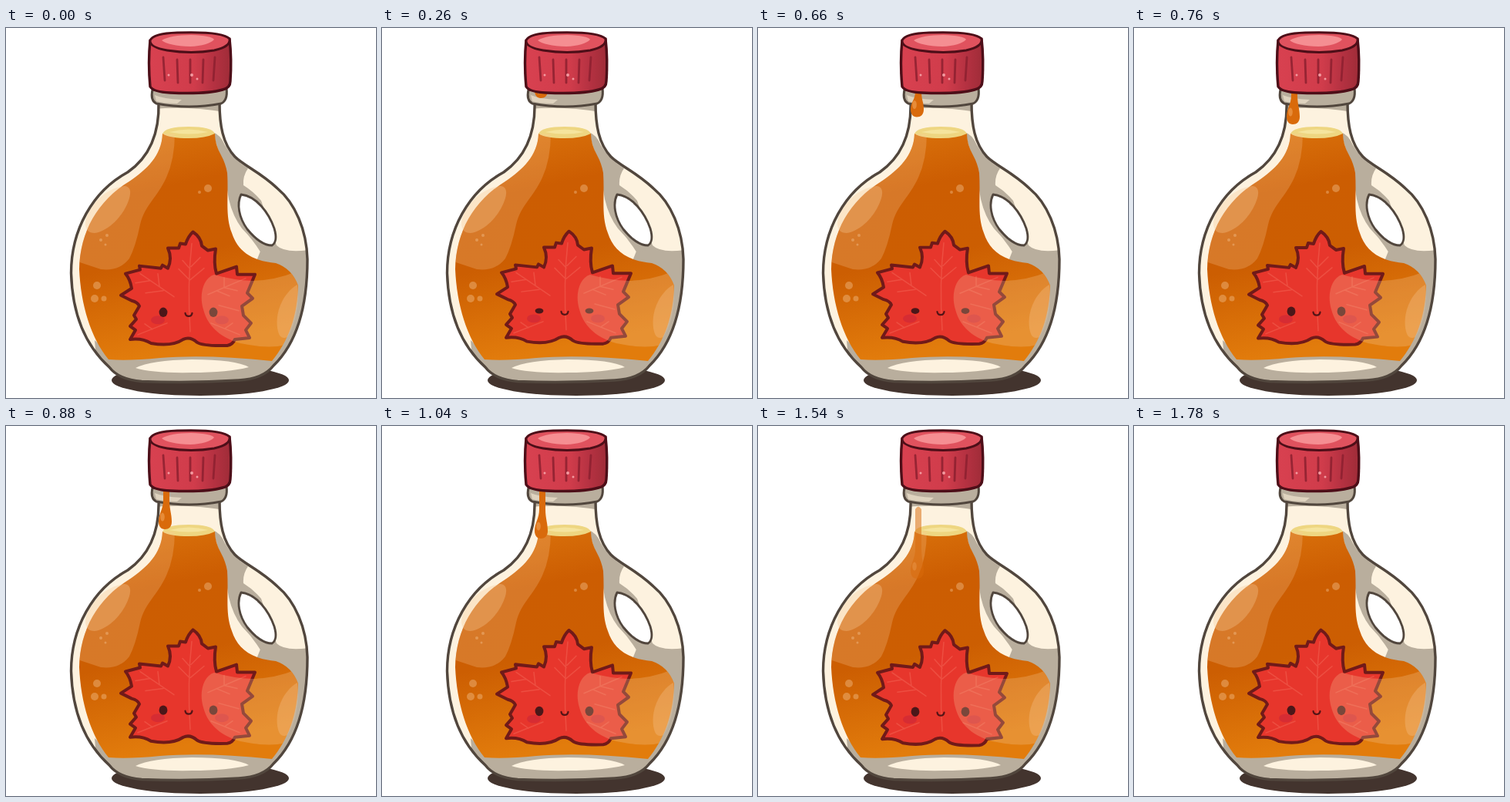
An HTML page for the animation above (1.8 s loop, 480 by 480 pixels).

```html
<!DOCTYPE html>
<html lang="en">
<head>
<meta charset="utf-8">
<title>Syrup bottle</title>
<style>
html, body { margin: 0; height: 100%; overflow: hidden; background: #fff; }
svg { display: block; width: 100vw; height: 100vh; }
</style>
</head>
<body>
<svg viewBox="0 0 480 480" fill="none" stroke-linecap="round" stroke-linejoin="round">
  <defs>
    <linearGradient id="syrup" x1="0" y1="0" x2=".2" y2="1">
      <stop offset="0" stop-color="#dc750d"/>
      <stop offset=".3" stop-color="#cc5d02"/>
      <stop offset=".6" stop-color="#cc5e02"/>
      <stop offset="1" stop-color="#e27c0c"/>
    </linearGradient>
    <linearGradient id="capSide">
      <stop offset="0" stop-color="#d84150"/>
      <stop offset=".55" stop-color="#d03c4b"/>
      <stop offset=".8" stop-color="#b43141"/>
      <stop offset="1" stop-color="#9f2c38"/>
    </linearGradient>
    <path id="glass" d="M198 96C199 130 191 164 158 187C112 212 84.500 262 84.500 318C86 370 103 412 134 440Q146 456 176 458.500Q240 461 302 457Q334 455 347 438C378 408 391 360 391 300C390 262 375 227 352 208C330 187 309 179 297 167C281 150 277 126 277 96Z"/>
    <path id="liquid" d="M203 137C202 166 182 184 160 199C119 224 96 264 95 313C97 359 110 402 133 430Q160 432 200 428Q260 423 345 432C366 407 378 374 379 334Q371 312 350 305C317 302 300 288 293 266C284 243 289 219 287 188Q285 176 279 165Q271 151 271 137Z"/>
    <path id="leaf" d="M242.500 264Q236 270 233 280L226 279L224 285L210 285Q216 298 210 311L203 307L201 311L173 308L174 313L155 318Q161 325 163 337L149 346L163 353Q171 355 173 360L166 372L169 377L161 386L168 391L161 403Q177 401 188 408Q215 413 230 403Q239 399 248 407Q256 412 287 411Q294 410 297 403L316 401L311 391L318 382L308 372L306 360L320 350L313 343L323 319L300 319L299 309L273 318Q269 304 272 286L262 288L254 282Q253 271 242.500 264Z"/>
    <clipPath id="inGlass"><use href="#glass"/></clipPath>
    <clipPath id="inLiquid"><use href="#liquid"/></clipPath>
  </defs>

  <ellipse cx="252" cy="457" rx="115" ry="20" fill="#43342e"/>

  <!-- glass -->
  <use href="#glass" fill="#fdf2df"/>
  <g clip-path="url(#inGlass)" fill="#b9ae9d">
    <path d="M115 405Q129 420 160 422H320Q360 380 370 333Q350 310 325 302L331 287Q343 291 351 282Q361 292 392 288V470H120Z"/>
    <path d="M192 88H284V109Q235 101 192 105Z"/>
    <path d="M268 135Q278 138 284 152Q294 170 314 182Q307 192 308 204Q321 212 331 224L352 285L331 292Q320 274 306 260Q294 244 289 222L282 180Z"/>
  </g>
  <path d="M168 441Q188 431 241 430Q298 430 315 440Q288 447 241 447Q190 448 168 441Z" fill="#fdf2df"/>

  <!-- syrup -->
  <use href="#liquid" fill="url(#syrup)"/>
  <path d="M203 137Q207 128 237 128Q267 128 271 137Q259 143 237 143Q212 143 203 137Z" fill="#eed681"/>
  <path d="M212 135Q237 128 262 135Q237 140 212 135Z" fill="#f5e49d"/>
  <path d="M195 136H219Q219 170 208 194C196 220 180 230 174 255Q168 284 160 299Q147 316 123 313L90 302V200Z" fill="#f5c796" opacity=".25" clip-path="url(#inLiquid)"/>

  <g id="bob">
    <use href="#leaf" fill="#e7362c" stroke="#701a19" stroke-width="4"/>
    <g stroke="#f26353" stroke-width="1.500" opacity=".55">
      <path d="M241 279Q235 332 239 393M239 312L229 301M238 326L224 312M240 309L252 297M239 326L257 311"/>
      <path d="M218 348L174 318M199 335L197 318M187 327L168 330M204 340L181 343"/>
      <path d="M262 345L311 324M283 336L283 323M283 336L300 340M273 340L290 347"/>
      <path d="M209 382L171 397M190 390L180 383M266 382L303 397M284 389L294 382M276 359L302 366"/>
    </g>
    <g fill="#cd2738" opacity=".65">
      <ellipse cx="197" cy="378" rx="9" ry="5.500"/>
      <ellipse cx="280" cy="378" rx="9" ry="5.500"/>
    </g>
    <g id="eyes" fill="#4b1719"></g>
    <path d="M232.500 369Q233 373 237 373Q241 373 241.500 369" stroke="#531416" stroke-width="2.200"/>
  </g>

  <!-- reflections -->
  <g fill="#f5c796">
    <path d="M103 253C105 231 130 207 154 205Q164 206 160 221C153 244 132 264 115 266Q103 266 103 253Z" opacity=".33"/>
    <path d="M270 320C256 324 250 346 256 365C262 390 285 407 315 411Q344 416 362 411L390 340L374 317Q350 327 320 328Q294 327 270 320Z" opacity=".27" clip-path="url(#inLiquid)"/>
    <path d="M378 333C360 343 347 370 353 394Q356 405 365 401C376 383 381 357 378 333Z" opacity=".3"/>
    <g opacity=".4">
      <circle cx="262" cy="208" r="5"/><circle cx="251" cy="213" r="2"/>
      <circle cx="118" cy="334" r="5"/><circle cx="115" cy="351" r="5"/>
      <circle cx="127" cy="351" r="3.500"/><circle cx="131" cy="269" r="2"/>
      <circle cx="123" cy="275" r="2"/><circle cx="129" cy="281" r="1.500"/>
    </g>
  </g>

  <!-- outline and handle -->
  <use href="#glass" stroke="#51463d" stroke-width="3.400"/>
  <path d="M305 216C299 228 302 246 313 261Q330 282 345 282Q353 277 348 260C341 240 325 218 305 216Z" fill="#fff" stroke="#51463d" stroke-width="2.800"/>

  <!-- collar -->
  <path d="M190 80Q187 94 195 98Q238 106 279 98Q288 94 286 78Z" fill="#b9ae9d" stroke="#51463d" stroke-width="3"/>
  <path d="M193 87Q204 92 228 93L222 98Q205 98 195 95Z" fill="#dfd3bf"/>

  <g id="drip">
    <path id="drop" fill="#d96a0b"/>
    <ellipse id="shine" rx="2.800" ry="5.500" fill="#f2a860" opacity=".55"/>
  </g>

  <!-- cap -->
  <path d="M187 16Q184 45 187 76Q191 83 213 84Q261 86 281 80Q291 78 291 69Q293 40 290 14Z" fill="url(#capSide)" stroke="#4d0e18" stroke-width="3.400"/>
  <path d="M187 16Q191 7 222 6Q281 4 290 14Q292 24 270 29Q241 34 209 29Q186 25 187 16Z" fill="#e0525e" stroke="#4d0e18" stroke-width="3"/>
  <path d="M202 16Q214 9 240 9Q267 10 270 15Q262 23 239 24Q211 23 202 16Z" fill="#f58e92"/>
  <path d="M204 38L206 68M222 41L223 71M239 41V71M256 41L255 71M271 38L269 68" stroke="#8c2030" stroke-width="2.800" opacity=".85"/>
  <g fill="#f29aa0"><circle cx="241" cy="61" r="2"/><circle cx="248" cy="66" r="1.500"/><circle cx="211" cy="61" r="1.500"/></g>
</svg>
<script>
const LOOP = 1800;
const $ = id => document.getElementById(id);

// Linear interpolation through [time, value] pairs
function track(t, keys) {
  let i = 1;
  while (i < keys.length - 1 && t > keys[i][0]) i++;
  const [t0, a] = keys[i - 1], [t1, b] = keys[i];
  return a + (b - a) * Math.min(1, Math.max(0, (t - t0) / (t1 - t0)));
}

const tipKeys = [[0, 80], [520, 102], [760, 125], [1040, 146], [1280, 174], [1800, 222]];
const topKeys = [[1040, 78], [1280, 96], [1800, 114]];
const fadeKeys = [[1320, 1], [1780, 0]];
const lidKeys = [[40, 1], [450, .18], [560, .18], [740, 1]];

$("eyes").innerHTML = [204, 269].map(x =>
  `<ellipse rx="5.400" ry="6.200" data-x="${x}"/>`).join("");

// A stem that widens slowly into a round bulb
function drawDrip(t) {
  const tip = track(t, tipKeys), top = track(t, topKeys);
  const bulb = tip - 10, neck = Math.max(top, tip - 42);
  $("drop").setAttribute("d", `M204 ${top + 3}Q208 ${top - 4} 212 ${top + 3}V${neck + 4}
    C212 ${neck + 16} 215 ${bulb - 10} 215 ${bulb}
    C215 ${tip - 3} 211 ${tip} 206 ${tip}
    C201 ${tip} 198 ${tip - 4} 198 ${bulb}
    C198 ${bulb - 10} 204 ${neck + 16} 204 ${neck + 4}Z`);
  $("shine").setAttribute("transform", `translate(203 ${tip - 16})`);
  $("drip").setAttribute("opacity", track(t, fadeKeys));
}

function draw(now) {
  const t = now % LOOP;
  const wave = -Math.sin(t / LOOP * 2 * Math.PI);
  $("bob").setAttribute("transform",
    `translate(240 ${264.5 + wave}) scale(1 ${1.003 + wave * .013}) translate(-240 -264)`);
  const lid = track(t, lidKeys);
  for (const eye of $("eyes").children)
    eye.setAttribute("transform", `translate(${eye.dataset.x} 368) scale(1 ${lid})`);
  drawDrip(t);
}

const begin = performance.now();
function tick() {
  draw(performance.now() - begin);
  requestAnimationFrame(tick);
}
tick();
</script>
</body>
</html>
```
